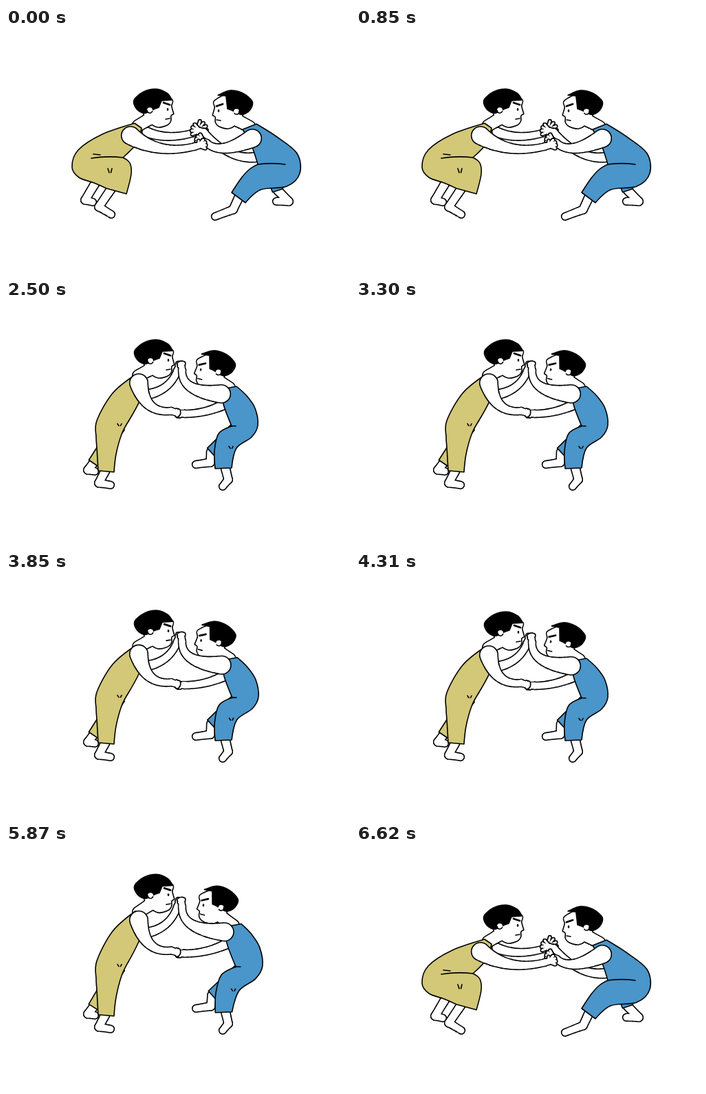
An HTML page with a canvas for the animation above (6.67 s loop, 500 px wide and 356 px high).

```html
<!DOCTYPE html>
<html lang="en">
<head>
<meta charset="utf-8">
<title>Wrestlers</title>
<style>
html, body { margin: 0; width: 100%; height: 100%; overflow: hidden; background: #fff; }
canvas { display: block; width: 500px; height: 356px; }
</style>
</head>
<body>
<canvas id="stage"></canvas>
<script>
const LOOP = 6670, TAU = 2 * Math.PI, SKIN = '#fff', INK = '#000', LINE = 1.6;
const canvas = document.getElementById('stage');
const ctx = canvas.getContext('2d');
const dpr = window.devicePixelRatio || 1;
canvas.width = 500 * dpr;
canvas.height = 356 * dpr;

// Joints of a pose, each "x,y" with extras: head tilt, mark size, hand angle and openness.
// Body runs nape, back, seat, cuff, knee, crotch, armpit, collar; arms run shoulder, elbow, wrist.
const points = s => s.split(' ').map(p => p.split(',').map(Number));
const pose = (head, body, crease, marks, near, far, nearFoot, farFoot) =>
  [head, body, crease, marks, near, far, nearFoot, farFoot].map(points);
const NAPE = 0, SEAT = 3, CROTCH = 10, COLLAR = 12;
const BODY_CORNERS = [NAPE, 6, 7, CROTCH, COLLAR];

const left = { face: 1, fringe: 0, color: '#d2c877', poses: [
  pose('214,108,0',
    '187,139 140,155 105,178 96,203 106,218 128,226 146,234 175,242 182,213 180,197 170,189 190,168 197,146',
    '124,190', '151,208,6',
    '181,157 222,186 274,173,-0.25,0.6', '205,152 235,164 273,153,-0.65,1',
    '152,236 135,261 153,272', '130,226 115,251 126,254'),
  pose('213,99,-0.2',
    '194,135 140,153 108,176 99,200 106,211 128,215 145,235 173,240 182,212 179,195 168,186 190,162 199,142',
    '126,187', '151,208,5',
    '182,150 224,172 282,163,0,0.9', '225,145 250,132 256,103,-0.6,0.5',
    '152,238 136,260 153,270', '132,224 116,249 127,252'),
  pose('215,77,0',
    '188,109 155,136 132,176 131,200 132,215 133,232 134,249 157,251 160,225 168,196 178,177 197,140 197,112',
    '178,177', '165,182,3',
    '193,121 202,166 240,162,0.3,0', '205,138 238,132 249,103,-1.2,0',
    '144,250 135,267 152,270', '127,238 119,248 129,250')
] };

const right = { face: -1, fringe: 9, color: '#4a95c9', poses: [
  pose('330,110,0',
    '364,140 394,159 423,183 427,212 408,231 370,236 348,255 328,240 342,219 354,206 366,199 357,172 344,148',
    '406,199', '348,215,0',
    '358,161 311,186 292,168,3.64,0.6', '366,188 325,195 288,152,3.4,0.8',
    '338,248 330,265 304,275', '395,237 411,253 393,253'),
  pose('281,111,0.12',
    '306,138 332,152 358,172 378,200 370,217 336,232 318,242 297,245 292,224 303,208 318,202 304,165 297,150',
    '350,202', '318,218,6',
    '308,160 245,172 229,140,4.38,1', '295,165 275,172 262,152,3.6,0.8',
    '314,240 323,260 311,272', '374,214 373,228 367,242'),
  pose('305,93,-0.1',
    '335,126 350,140 362,158 366,183 357,200 335,216 328,245 304,246 303,220 309,195 328,184 316,152 314,130',
    '334,184', '327,215,3',
    '313,137 255,135 256,103,4.6,0', '318,152 290,166 260,166,3.14,0',
    '319,246 323,262 315,272', '298,222 297,237 276,240')
] };

const clamp = v => Math.max(0, Math.min(1, v));
const mix = (a, b, k) => Array.isArray(a) ? a.map((v, i) => mix(v, b[i], k)) : a + (b - a) * k;
function ease(t, from, to) {
  const k = clamp((t - from) / (to - from));
  return k * k * (3 - 2 * k);
}

function stateAt(t) {
  let from = 0, to = 1, k = ease(t, 1500, 1710), lift = 0;
  if (t > 1850) {
    [from, to, k] = [1, 2, ease(t, 1850, 2100)];
    lift = 5 * k * (1 - ease(t, 2150, 2500));
  }
  if (t > 3470) lift = 12.5 * (1 - Math.cos((t - 3470) / 420 * TAU));
  if (t > 6410) {
    [from, to, k] = [2, 0, ease(t, 6410, 6600)];
    lift = 0;
  }
  const sway = t < 1500 ? 0.6 * Math.sin(t / 425 * TAU) : 0;
  return { from, to, k, lift, sway };
}

// Feet stay planted; the higher a joint, the more it rises and leans.
function shift([x, y, ...rest], s) {
  const rise = clamp((240 - y) / 180);
  const back = clamp((x - 265) / 70) * clamp((250 - y) / 60);
  return [x + s.sway * rise + s.lift * 0.45 * back, y - s.lift * rise, ...rest];
}

function jointsAt(man, s) {
  const [[head], body, [crease], [marks], near, far, nearFoot, farFoot] =
    mix(man.poses[s.from], man.poses[s.to], s.k).map(list => list.map(p => shift(p, s)));
  return { ...man, head, body, crease, marks, near, far, nearFoot, farFoot };
}

// Smooth closed outline, sharp at the given corners.
function outline(pts, corners = []) {
  const n = pts.length, path = new Path2D();
  const at = i => pts[(i + n) % n];
  const slope = i => corners.includes(i % n) ? [0, 0]
    : [0, 1].map(j => (at(i + 1)[j] - at(i - 1)[j]) / 6);
  path.moveTo(...pts[0]);
  for (let i = 0; i < n; i++) {
    const a = at(i), b = at(i + 1), u = slope(i), v = slope(i + 1);
    path.bezierCurveTo(a[0] + u[0], a[1] + u[1], b[0] - v[0], b[1] - v[1], b[0], b[1]);
  }
  path.closePath();
  return path;
}

// Tapered limb: discs along a line or a bend.
function tube(a, bend, b, r0, r1) {
  const path = new Path2D(), steps = 40;
  for (let i = 0; i <= steps; i++) {
    const k = i / steps, q = 1 - k;
    const [x, y] = [0, 1].map(j => q * q * a[j] + 2 * q * k * bend[j] + k * k * b[j]);
    const r = r1 + (r0 - r1) * q * q;
    path.moveTo(x + r, y);
    path.arc(x, y, r, 0, TAU);
  }
  return path;
}
const rod = (a, b, r0, r1) => tube(a, mix(a.slice(0, 2), b, 0.5), b, r0, r1);

// Several paths joined under one outline.
function merge(paths) {
  ctx.lineWidth = 2 * LINE;
  for (const p of paths) ctx.stroke(p);
  ctx.fillStyle = SKIN;
  for (const p of paths) ctx.fill(p);
}

function paint(path, color) {
  ctx.fillStyle = color;
  ctx.fill(path);
  ctx.lineWidth = LINE;
  ctx.stroke(path);
}

function stroke(a, b, width = LINE, bow = 0) {
  ctx.beginPath();
  ctx.moveTo(a[0], a[1]);
  ctx.quadraticCurveTo((a[0] + b[0]) / 2, (a[1] + b[1]) / 2 - bow, b[0], b[1]);
  ctx.lineWidth = width;
  ctx.stroke();
}

const polar = (p, angle, d) => [p[0] + d * Math.cos(angle), p[1] + d * Math.sin(angle)];

function arm([shoulder, elbow, wrist], girth) {
  const [, , angle, open] = wrist;
  const palm = polar(wrist, angle, 6);
  const paths = [tube(shoulder, elbow, wrist, girth, 4.6), rod(wrist, palm, 4.6, 4.2)];
  for (let i = 0; i < 4; i++) {
    const tip = polar(palm, angle + (i - 1.5) * 0.42, 5 + 9 * open);
    paths.push(rod(palm, tip, 2.2, 2.3 - 0.8 * open));
  }
  paths.push(rod(palm, polar(palm, angle - 1.3, 4 + 5 * open), 2, 1.5));
  merge(paths);
}

function foot([top, heel, toe]) {
  merge([rod(top, heel, 5.8, 5.4), rod(heel, toe, 5.4, 4.6)]);
}

function farLeg(m) {
  const cuff = m.farFoot[0], hip = mix(m.body[CROTCH], m.body[SEAT], 0.3);
  const side = Math.atan2(hip[1] - cuff[1], hip[0] - cuff[0]) + Math.PI / 2;
  const quad = [polar(cuff, side, 8), polar(cuff, side, -8), polar(hip, side, -10), polar(hip, side, 10)];
  paint(outline(quad, [0, 1, 2, 3]), m.color);
}

function head(m) {
  const [cx, cy, tilt] = m.head, c = Math.cos(tilt), s = Math.sin(tilt), f = m.fringe;
  const at = (x, y) => [cx + m.face * (x * c - y * s), cy + x * s + y * c];
  const shape = (str, corners) => outline(points(str).map(p => at(...p)), corners);
  const base = mix(m.body[NAPE], m.body[COLLAR], 0.5);
  merge([
    rod(at(-1, 22), base, 9, 8),
    shape('26,-4 26,6 29,17 25,20 25,27 20,33 6,36 -6,28 -14,12 0,-14', [2])
  ]);
  const front = `${27 - f * 0.6},${-3 - f}`, temple = `${12 - f * 0.2},${-2 - f}`;
  paint(shape(`${front} 20,-13 4,-19 -14,-15 -28,-3 -25,9 -15,16 -8,15 2,10 8,8 ${temple}`, [0, 7, 9, 10]), INK);

  const lobe = at(-5, 12);
  ctx.beginPath();
  ctx.arc(...lobe, 4, 0, TAU);
  ctx.fillStyle = SKIN;
  ctx.fill();
  ctx.beginPath();
  ctx.ellipse(...lobe, 4, 4, m.face > 0 ? 0 : -Math.PI / 5, 0.4, Math.PI);
  ctx.lineWidth = LINE;
  ctx.stroke();

  stroke(at(15, 1), at(24, 4), 2.8);
  stroke(at(21, 10), at(21, 11.5), 2.4);
  stroke(at(18, 25), at(24, 24));
}

function body(m) {
  paint(outline(m.body, BODY_CORNERS), m.color);
  const crotch = m.body[CROTCH], span = m.crease[0] - crotch[0];
  stroke(crotch, m.crease, LINE, Math.abs(span) * 0.07);
  if (m.face > 0 && Math.abs(span) > 10) {
    const [x, y] = m.crease;
    stroke([x + 3, y - 6], [x + 13, y - 5]);
  }
  const [x, y, size] = m.marks;
  if (size < 1) return;
  stroke([x - 3, y - size / 2], [x - 1, y + size / 2]);
  stroke([x + 3, y - size / 2], [x + 1.5, y + size / 2]);
}

function frame(t) {
  const s = stateAt(t);
  const men = [right, left].map(m => jointsAt(m, s));
  const [r, l] = men;
  ctx.setTransform(dpr, 0, 0, dpr, 0, 0);
  ctx.fillStyle = '#fff';
  ctx.fillRect(0, 0, 500, 356);
  ctx.strokeStyle = INK;
  ctx.lineCap = ctx.lineJoin = 'round';
  for (const m of men) {
    foot(m.farFoot);
    farLeg(m);
  }
  arm(l.far, 6.5);
  arm(r.far, 6.5);
  men.forEach(head);
  for (const m of men) {
    foot(m.nearFoot);
    body(m);
  }
  for (const m of men) arm(m.near, 12.5);
}

const start = performance.now();
function tick() {
  frame((performance.now() - start) % LOOP);
  requestAnimationFrame(tick);
}
tick();
</script>
</body>
</html>
```
